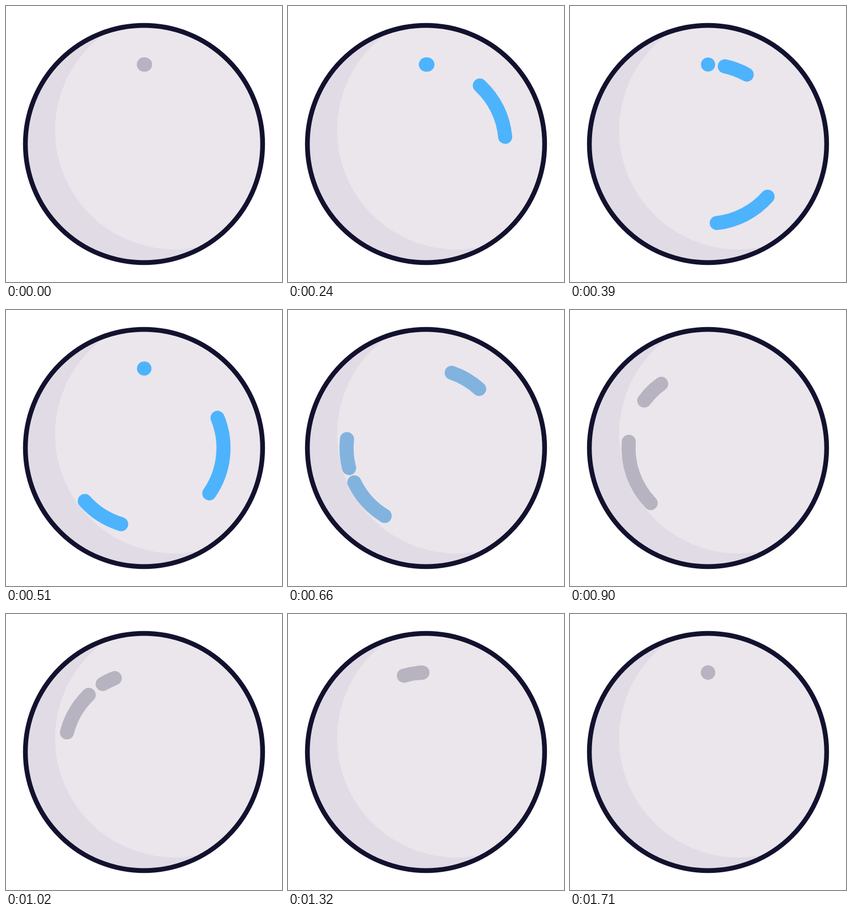
These frames come from a looping animation (500x500 px, 1770 ms). An HTML page with a canvas:

```html
<!DOCTYPE html>
<html lang="en">
<head>
<meta charset="utf-8">
<title>Loader</title>
<style>
html, body { margin: 0; width: 100%; height: 100%; overflow: hidden; background: #fff; }
canvas { display: block; width: 500px; height: 500px; }
</style>
</head>
<body>
<canvas id="stage" width="500" height="500"></canvas>
<script>
const ctx = document.getElementById('stage').getContext('2d');
const LOOP = 1770, STEP = 30, LAST = 1710;
const CENTER = 250, TRACK = 144;
const GREY = [183, 179, 192], BLUE = [77, 179, 253];

const ramp = (t, a, b) => Math.min(1, Math.max(0, (t - a) / (b - a)));

// Easing like cubic-bezier(x1, 0, x2, 1), solved by bisection.
const bezier = (x1, x2) => u => {
  let lo = 0, hi = 1;
  for (let i = 0; i < 24; i++) {
    const p = (lo + hi) / 2, q = 1 - p;
    const x = 3 * p * q * q * x1 + 3 * p * p * q * x2 + p * p * p;
    if (x < u) lo = p; else hi = p;
  }
  return lo * lo * (3 - 2 * lo);
};
const soft = bezier(0.248, 0.172), sharp = bezier(0.4, 0.02);

// Each arc's ends run one full turn: head and tail hold [start, end] in ms.
const arcs = [
  { ease: soft, head: [-30, 1500], tail: [47, 1566] },
  { ease: sharp, head: [194, 1504], tail: [250, 1560] },
  { ease: sharp, head: [490, 1490], tail: [510, 1690] }
];

function tint(t) {
  const k = ramp(t, 0, 180) - ramp(t, 570, 750);
  return `rgb(${GREY.map((g, i) => Math.round(g + (BLUE[i] - g) * k)).join()})`;
}

function circle(x, y, r) {
  ctx.beginPath();
  ctx.arc(x, y, r, 0, 2 * Math.PI);
}

function drawBall() {
  ctx.save();
  circle(CENTER, CENTER, 214);
  ctx.clip();
  ctx.fillStyle = '#e1dbe5';
  ctx.fillRect(0, 0, 500, 500);
  circle(305, 225, 216);
  ctx.fillStyle = '#eae6ec';
  ctx.fill();
  ctx.restore();
  circle(CENTER, CENTER, 214.9);
  ctx.lineWidth = 8.6;
  ctx.strokeStyle = '#12122f';
  ctx.stroke();
}

function drawArc(from, to) {
  const angle = turn => (turn - 0.25) * 2 * Math.PI;
  ctx.beginPath();
  ctx.arc(CENTER, CENTER, TRACK, angle(from), angle(Math.max(to, from + 0.0002)));
  ctx.stroke();
}

function draw(t) {
  ctx.fillStyle = '#fff';
  ctx.fillRect(0, 0, 500, 500);
  drawBall();
  ctx.lineCap = 'round';
  ctx.lineWidth = 25.5;
  ctx.strokeStyle = tint(t);
  for (const { ease, head, tail } of arcs) {
    drawArc(ease(ramp(t, ...tail)), ease(ramp(t, ...head)));
  }
}

const start = performance.now();
function tick() {
  const t = (performance.now() - start) % LOOP;
  draw(Math.min(LAST, Math.floor(t / STEP) * STEP));
  requestAnimationFrame(tick);
}
tick();
</script>
</body>
</html>
```
